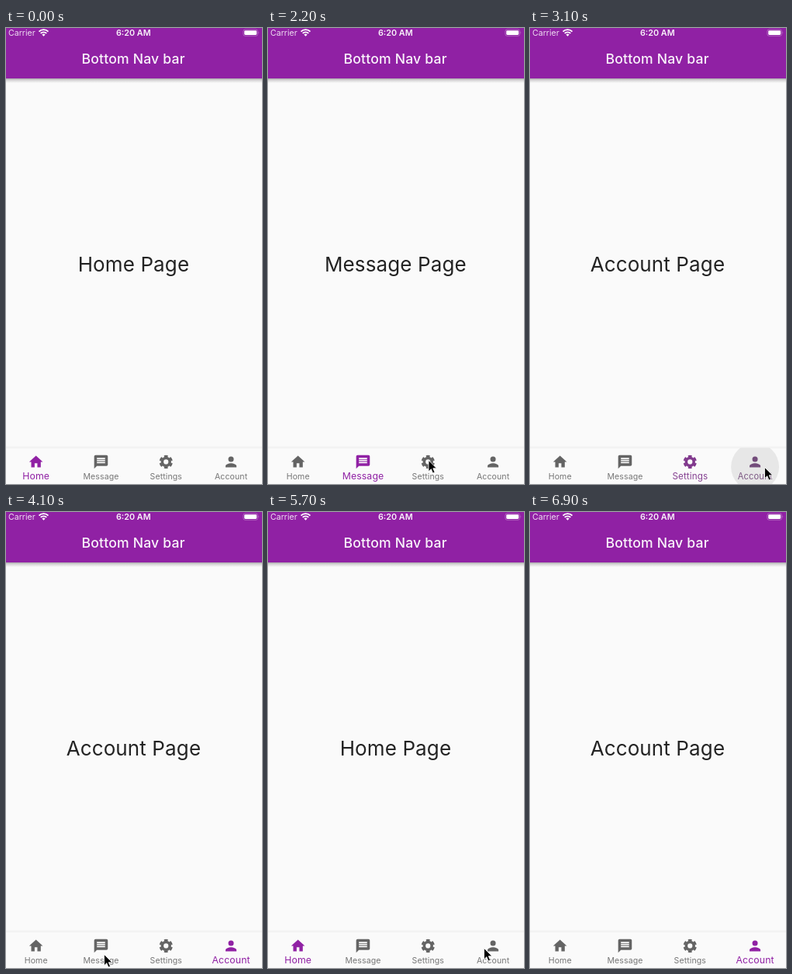
Animation, 330 px wide and 588 px high, one loop 9.4 s. Source, as an HTML page:

```html
<!DOCTYPE html>
<html lang="en">
<head>
<meta charset="utf-8">
<title>Bottom Nav bar</title>
<style>
  html, body { margin: 0; height: 100%; overflow: hidden; background: #fafafa; }
  svg { display: block; width: 100vw; height: 100vh; font-family: Inter, Roboto, sans-serif; }
  .mid { text-anchor: middle; }
</style>
</head>
<body>
<svg viewBox="0 0 330 588">
  <defs>
    <linearGradient id="shade" x2="0" y2="1">
      <stop offset="0" stop-opacity=".32"/>
      <stop offset=".4" stop-opacity=".14"/>
      <stop offset="1" stop-opacity="0"/>
    </linearGradient>
    <clipPath id="nav"><path d="M0 541.5h330V588H0z"/></clipPath>
  </defs>
  <rect width="330" height="588" fill="#fafafa"/>
  <rect y="65" width="330" height="6" fill="url(#shade)"/>
  <rect width="330" height="65" fill="#9021a4"/>

  <g fill="#fff">
    <text x="3" y="10" font-size="10.6" fill-opacity=".85">Carrier</text>
    <text class="mid" x="164.3" y="10" font-size="10.8" font-weight="600" fill-opacity=".95">6:20 AM</text>
    <text class="mid" x="164.1" y="46" font-size="17.6" font-weight="500" letter-spacing=".2" fill-opacity=".95">Bottom Nav bar</text>
    <path d="M42.5 4.6a8.5 8.5 0 0 1 12 0M44.7 6.9a5.4 5.4 0 0 1 7.6 0" fill="none" stroke="#fff" stroke-width="1.9"/>
    <path d="M48.5 10.8l-2.1-2.2a3 3 0 0 1 4.2 0z"/>
    <rect x="305.9" y="1.9" width="18.6" height="8.4" rx="2.4" fill="none" stroke="#fff" stroke-opacity=".35" stroke-width=".8"/>
    <rect x="307.2" y="3.2" width="16" height="5.8" rx="1.4"/>
    <path d="M325.6 4.6q1.4 1.5 0 3z" fill-opacity=".4"/>
  </g>

  <text id="page" class="mid" x="164.4" y="313.5" font-size="26" letter-spacing=".12" fill="#232323"></text>

  <path d="M0 539.5h330" stroke="#f6f6f6"/>
  <path d="M0 541h330" stroke="#ececec"/>
  <g clip-path="url(#nav)"><circle id="ripple" cy="566" r="31"/></g>
  <g id="tabs"></g>
  <path id="cursor" d="M.5.5v14.3l3.3-3.1 2.2 5.3 2.5-1.1-2.2-5.1h4.5z" stroke="#fff" stroke-width=".8"/>
</svg>
<script>
const $ = id => document.getElementById(id);
const LOOP = 9400, TRAVEL = 400, HIDE = 6900;
const GREY = [100, 100, 100], PURPLE = [144, 33, 164];

const icons = {
  Home: '<path d="M10 20v-6h4v6h5v-8h3L12 3 2 12h3v8z"/>',
  Message: '<path d="M20 2H4q-2 0-2 2v18l4-4h14q2 0 2-2V4q0-2-2-2zM18 14H6v-2h12zM18 11H6V9h12zM18 8H6V6h12z"/>',
  Settings: `<g fill="none" stroke="currentColor">
    <circle cx="12" cy="12" r="5.6" stroke-width="4.1"/>
    <circle cx="12" cy="12" r="8.5" stroke-width="2.8" pathLength="360" stroke-dasharray="36 24" stroke-dashoffset="-12"/></g>`,
  Account: '<circle cx="12" cy="8" r="4"/><path d="M12 14c-2.67 0-8 1.34-8 4v2h16v-2c0-2.66-5.33-4-8-4z"/>'
};

const tabs = Object.entries(icons).map(([name, icon], i) => {
  const x = 38.7 + 83.8 * i;
  const g = document.createElementNS('http://www.w3.org/2000/svg', 'g');
  g.setAttribute('fill', 'currentColor');
  g.innerHTML = `<g transform="translate(${x - 10.6} 548.9) scale(.88)">${icon}</g>
    <text class="mid" x="${x}" y="582" letter-spacing=".1">${name}</text>`;
  $('tabs').append(g);
  return { name, x, g, label: g.querySelector('text') };
});

// Pointer visits: when it arrives and where, then when it taps which tab.
const visits = [
  { at: 100, x: 253, y: 528 },
  { at: 600, x: 119, y: 557, tap: 1600, tab: 1 },
  { at: 2200, x: 206.5, y: 557, tap: 2400, tab: 2 },
  { at: 2900, x: 302, y: 566, tap: 3100, tab: 3 },
  { at: 3800, x: 55, y: 567 },
  { at: 4100, x: 126, y: 570, tap: 4300, tab: 1 },
  { at: 4900, x: 26, y: 565, tap: 5200, tab: 0 },
  { at: 5700, x: 278, y: 562, tap: 5900, tab: 3 }
];
const taps = [{ tap: -LOOP, tab: 0 }, ...visits.filter(v => v.tap)];

const clamp = v => Math.max(0, Math.min(1, v));
const ease = v => v * v * (3 - 2 * v);
const progress = (t, start, length) => ease(clamp((t - start) / length));
const mix = (a, b, k) => a + (b - a) * k;

function drawTabs(t) {
  const now = taps.findLastIndex(v => v.tap <= t);
  const { tap, tab } = taps[now];
  const last = taps[now - 1]?.tab;
  const k = progress(t, tap - 80, 200);

  $('page').textContent = tabs[tab].name + ' Page';
  tabs.forEach(({ g, label }, i) => {
    const on = i === tab ? k : i === last ? 1 - k : 0;
    g.style.color = `rgb(${GREY.map((c, j) => Math.round(mix(c, PURPLE[j], on)))})`;
    label.style.fillOpacity = mix(.88, 1, on);
    label.style.fontSize = mix(10.56, 12.32, on) + 'px';
  });
  $('ripple').setAttribute('cx', tabs[tab].x);
  $('ripple').style.opacity = .075 * (1 - progress(t, tap, 400));
}

function drawCursor(t) {
  const shown = t >= visits[0].at && t < HIDE;
  $('cursor').style.display = shown ? '' : 'none';
  if (!shown) return;
  const i = visits.findLastIndex(v => v.at <= t);
  const from = visits[i], to = visits[i + 1] ?? from;
  const length = Math.min(TRAVEL, to.at - from.at) || 1;
  const k = progress(t, to.at - length, length);
  $('cursor').setAttribute('transform', `translate(${mix(from.x, to.x, k)} ${mix(from.y, to.y, k)})`);
}

function frame() {
  // The picture advances in tenths of a second.
  const t = Math.floor(performance.now() % LOOP / 100) * 100;
  drawTabs(t);
  drawCursor(t);
  requestAnimationFrame(frame);
}
frame();
</script>
</body>
</html>
```
